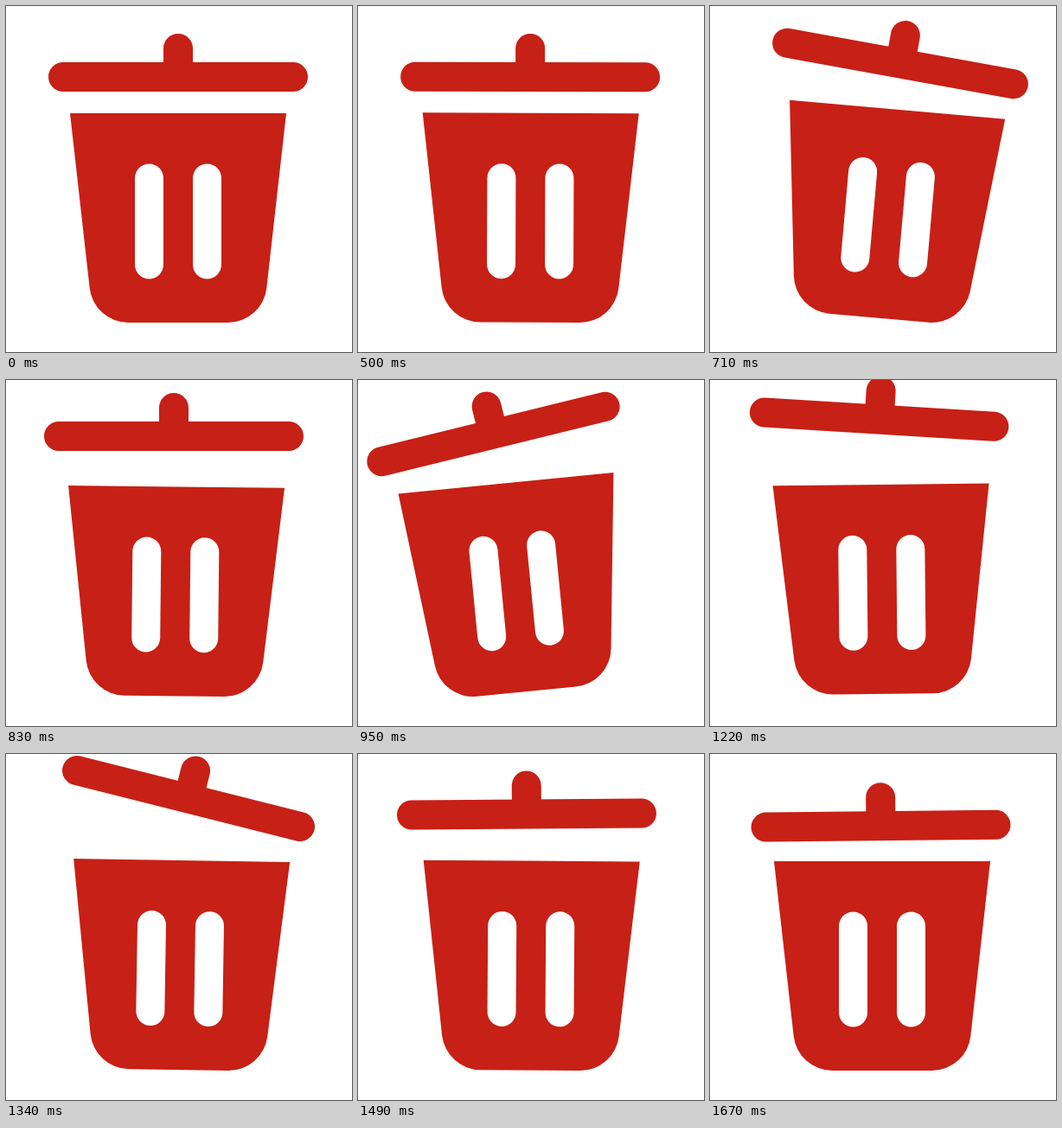
An HTML page with a canvas that plays this animation: 400x400 px, repeating every 1730 ms.

```html
<!DOCTYPE html>
<html lang="en">
<head>
<meta charset="utf-8">
<title>Bin</title>
<style>
html, body { margin: 0; width: 100%; height: 100%; overflow: hidden; background: #fff; }
canvas { display: block; width: 100vw; height: 100vh; object-fit: contain; }
</style>
</head>
<body>
<canvas id="stage" width="400" height="400"></canvas>
<script>
const ctx = document.getElementById('stage').getContext('2d');
const RED = '#c72016', WHITE = '#fff';
const LOOP = 1730, START = 500, STEP = 30, LAST = 1670;
const MID = 199, CORNER = { x: 57.6, y: 321, r: 45 };

// time, angle in degrees, slide, hop
const BODY = [
  [470, 0, 0, 0], [500, 0.2, 0, 0], [710, 5.07, 0, 0], [740, 5.35, 0, 0],
  [830, 0.6, -4, 0], [950, -5.6, -8.5, 0], [980, -5.7, -8.2, 0.6],
  [1100, -3.45, -1.2, 8.9], [1220, -0.6, 0.6, 2.5], [1340, 0.92, 1, 0], [1610, 0, 0, 0]
];

// time, centre x, centre y, angle in degrees
const LID = [
  [470, 199, 82, 0], [500, 199.1, 82, 0.1], [710, 220, 66.5, 10.26], [740, 223.3, 65.5, 10.8],
  [830, 194, 65, 0], [950, 156.5, 62.5, -13.8], [980, 154.8, 57, -13.9],
  [1010, 157, 52.3, -12.8], [1100, 173, 48, -8.6], [1210, 194, 45.5, 2.5],
  [1340, 211, 51.5, 14.1], [1550, 191, 76, -4], [1670, 197.5, 83.2, -0.6]
];

// Slope that never overshoots: zero at turning points
function slope(keys, i, c) {
  if (i === 0 || i === keys.length - 1) return 0;
  const rate = j => (keys[j + 1][c] - keys[j][c]) / (keys[j + 1][0] - keys[j][0]);
  const a = rate(i - 1), b = rate(i);
  return a * b > 0 ? 2 * a * b / (a + b) : 0;
}

function pose(keys, t) {
  const end = keys.length - 1;
  if (t <= keys[0][0]) return keys[0].slice(1);
  if (t >= keys[end][0]) return keys[end].slice(1);
  const i = keys.findIndex(k => k[0] > t) - 1;
  const [p, q] = [keys[i], keys[i + 1]];
  const d = q[0] - p[0], u = (t - p[0]) / d;
  const s = u * u * (3 - 2 * u);
  return [1, 2, 3].map(c =>
    p[c] + (q[c] - p[c]) * s +
    d * u * (1 - u) * ((1 - u) * slope(keys, i, c) - u * slope(keys, i + 1, c)));
}

function pill(x, y, w, h, color) {
  ctx.fillStyle = color;
  ctx.beginPath();
  ctx.roundRect(x, y, w, h, Math.min(w, h) / 2);
  ctx.fill();
}

const turn = deg => ctx.rotate(deg * Math.PI / 180);

function drawBody([angle, slide, hop]) {
  // The bin rocks on whichever lower corner it leans towards
  const px = MID + Math.sign(angle) * CORNER.x;
  ctx.save();
  ctx.translate(px + slide, CORNER.y - hop);
  turn(angle);
  ctx.translate(-px, -CORNER.y);
  ctx.fillStyle = RED;
  ctx.beginPath();
  ctx.moveTo(MID, 124);
  ctx.lineTo(324, 124);
  ctx.arcTo(296.8, 366, MID, 366, CORNER.r);
  ctx.arcTo(101.2, 366, 74, 124, CORNER.r);
  ctx.lineTo(74, 124);
  ctx.fill();
  pill(149, 182.5, 33, 133, WHITE);
  pill(216, 182.5, 33, 133, WHITE);
  ctx.restore();
}

function drawLid([x, y, angle]) {
  ctx.save();
  ctx.translate(x, y);
  turn(angle);
  pill(-150, -17, 300, 34, RED);
  pill(-17, -50, 34, 60, RED);
  ctx.restore();
}

function frame() {
  const now = performance.now() % LOOP;
  const t = now < START ? 0
    : Math.min(LAST, START + Math.floor((now - START) / STEP) * STEP);
  ctx.fillStyle = WHITE;
  ctx.fillRect(0, 0, 400, 400);
  drawBody(pose(BODY, t));
  drawLid(pose(LID, t));
  requestAnimationFrame(frame);
}
frame();
</script>
</body>
</html>
```
